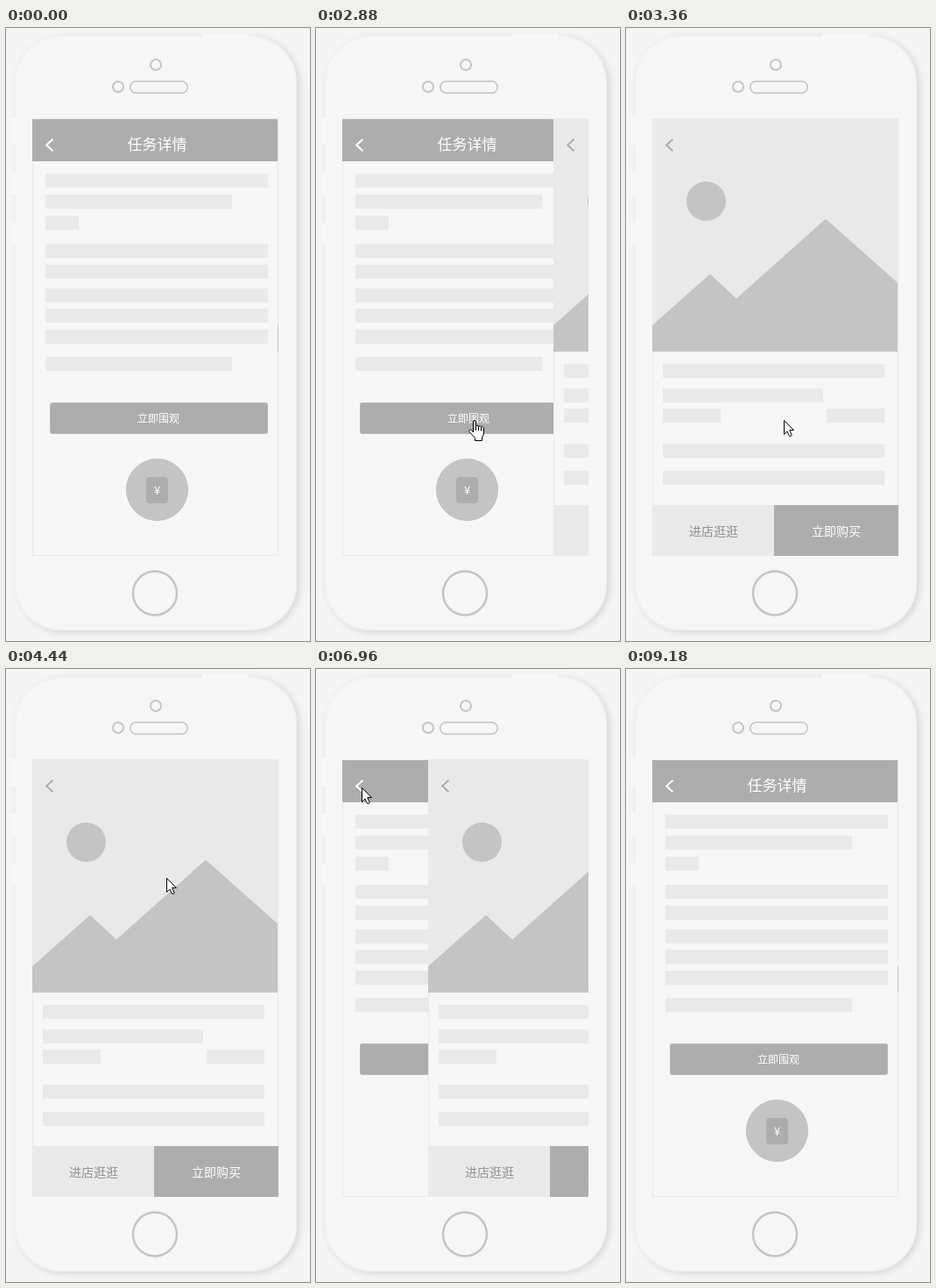
These frames come from a looping animation (347 by 699 pixels, 9.9 s). An HTML page:

```html
<!DOCTYPE html>
<html lang="zh-CN">
<head>
<meta charset="utf-8">
<title>任务详情</title>
<style>
  html, body { margin: 0; width: 100%; height: 100%; overflow: hidden; background: #f5f5f5; }
  svg { display: block; width: 100vw; height: 100vh; }
  text { font-family: "Noto Sans CJK SC", "Noto Sans CJK", sans-serif; text-anchor: middle; fill: #fff; }
  .light { fill: #e9e9e9; }
  .mid { fill: #c4c4c4; }
  .dark { fill: #adadad; }
  .page { fill: #f6f6f6; stroke: #e9e9e9; shape-rendering: crispEdges; }
  .line { fill: none; stroke: #c4c4c4; stroke-width: 2; }
  .chevron { fill: none; stroke-width: 2; }
  #pointer path { fill: #fff; stroke: #000; stroke-linejoin: round; }
</style>
</head>
<body>
<svg viewBox="0 0 347 699" xmlns="http://www.w3.org/2000/svg">
  <defs>
    <clipPath id="screen"><rect x="30" y="103" width="281" height="499"/></clipPath>
    <filter id="shade" x="-10%" y="-10%" width="120%" height="120%">
      <feDropShadow dx="3" dy="2" stdDeviation="4" flood-color="#000" flood-opacity=".14"/>
    </filter>
    <rect id="sheet" class="page" x="30.5" y="103.5" width="280" height="498"/>
    <path id="chevron" class="chevron" d="M53.5 126.7L46.2 133.5L53.5 140.3"/>
  </defs>
  <rect width="347" height="699" fill="#f5f5f5"/>

  <g id="phone">
    <rect x="10" y="9" width="322" height="678" rx="54" fill="#f6f6f6" filter="url(#shade)"/>
    <rect x="10.5" y="9.5" width="321" height="677" rx="53.5" fill="none" stroke="#efefef"/>
    <g fill="#f7f7f7">
      <rect x="224" y="6" width="53" height="5" rx="1"/>
      <rect x="6" y="102" width="6" height="31" rx="1"/>
      <rect x="6" y="165" width="6" height="25" rx="1"/>
      <rect x="6" y="222" width="6" height="24" rx="1"/>
    </g>
    <g class="line">
      <circle cx="171" cy="42" r="6"/>
      <circle cx="128" cy="67" r="6"/>
      <rect x="141.8" y="60.8" width="65.4" height="13.4" rx="6.7" stroke-width="1.6"/>
      <circle cx="170" cy="644.5" r="25" stroke-width="2.5"/>
    </g>
  </g>

  <g clip-path="url(#screen)">
    <g id="task">
      <use href="#sheet"/>
      <rect class="dark" x="30" y="104" width="281" height="48"/>
      <use href="#chevron" stroke="#fff"/>
      <text x="172.5" y="139" font-size="17">任务详情</text>
      <rect id="watch" x="50.5" y="427.5" width="248" height="35" rx="2" stroke="#b8b8b8"/>
      <text x="174" y="450" font-size="12">立即围观</text>
      <circle class="mid" cx="172.5" cy="526.5" r="35" stroke="#bdbdbd"/>
      <rect class="dark" x="160" y="512" width="25" height="30" rx="4"/>
      <text x="172.5" y="532" font-size="13">¥</text>
    </g>

    <g id="shop">
      <use href="#sheet"/>
      <rect class="light" x="30" y="103" width="281" height="266"/>
      <circle class="mid" cx="91.5" cy="197.5" r="22.5"/>
      <path class="mid" d="M30 339L96 280.5L126 308.5L228 217.5L310 290.5V369H30Z"/>
      <use id="back" href="#chevron"/>
      <rect class="light" x="30" y="544" width="139" height="58"/>
      <rect class="dark" x="169" y="544" width="142" height="58"/>
      <text x="100" y="578.5" font-size="14" style="fill:#929292">进店逛逛</text>
      <text x="240" y="578.5" font-size="14">立即购买</text>
    </g>
  </g>

  <g id="pointer">
    <path id="arrow" d="M.5 .5V16.5L3.9 13L6.6 18.4H8.4L9.2 17.2L6.7 11.6H11.5Z"/>
    <g id="hand" transform="translate(-6 0)">
      <path d="M5.5 14V2a1.5 1.5 0 0 1 3 0V7.5a1.5 1.5 0 0 1 3 .5a1.5 1.5 0 0 1 3 .8a1.5 1.5 0 0 1 3 1V16L15.5 20V23.5H7.5V20.5L1.2 13.5C-.2 11.4 2.4 10.2 3.6 11.8Z"/>
      <path d="M8.5 7.5V12M11.5 8V12M14.5 9V12.5"/>
    </g>
  </g>
</svg>
<script>
const LOOP = 9900, STEP = 60, AWAY = 280, SLIDE = 500;
const $ = id => document.getElementById(id);

// Placeholder text: one bar per width, evenly spaced downwards
function paragraph(page, x, y, gap, ...widths) {
  widths.forEach((w, i) => $(page).insertAdjacentHTML("beforeend",
    `<rect class="light" x="${x}" y="${Math.floor(y + i * gap)}" width="${w}" height="15.5" shape-rendering="crispEdges"/>`));
}
paragraph("task", 45, 166, 24, 254, 213, 38);
paragraph("task", 45, 246, 24, 254, 254);
paragraph("task", 45, 297, 23.5, 254, 254, 254);
paragraph("task", 45, 375, 0, 213);
paragraph("shop", 42, 383, 0, 253);
paragraph("shop", 42, 411, 23, 183, 66);
paragraph("shop", 229, 434, 0, 66);
paragraph("shop", 42, 474, 31, 253, 253);

// The pointer rests wherever it stops, then sets off again
const path = [];
const stop = (time, x, y, rest = 0) => {
  path.push({ time, x, y });
  if (rest) path.push({ time: time + rest, x, y });
};
stop(120, 345, 50);
stop(1140, 174, 395);
stop(1620, 180, 447, 2220);
stop(4140, 54, 127);
stop(4440, 183, 238);
stop(4860, 230, 414);
stop(5160, 252, 561, 360);
stop(6000, 66, 169);
stop(6180, 52, 135, 1020);
stop(7740, 118, 486);
stop(8100, 147, 535, 600);
stop(9180, 400, 140);

const clamp = v => Math.max(0, Math.min(1, v));
const within = (v, a, b) => v >= a && v < b;
const rate = (i, k) => (path[i + 1][k] - path[i][k]) / (path[i + 1].time - path[i].time);

// Slope that never overshoots a path point
function slope(i, k) {
  if (i === 0) return rate(0, k);
  if (i === path.length - 1) return rate(i - 1, k);
  const a = rate(i - 1, k), b = rate(i, k);
  return a * b > 0 ? 2 * a * b / (a + b) : 0;
}

function along(t, k) {
  let i = 0;
  while (i < path.length - 2 && t >= path[i + 1].time) i++;
  const p = path[i], q = path[i + 1], d = q.time - p.time;
  const u = clamp((t - p.time) / d), v = 1 - u;
  return Math.round(v * v * (1 + 2 * u) * p[k] + u * u * (3 - 2 * u) * q[k]
    + d * u * v * (v * slope(i, k) - u * slope(i + 1, k)));
}

function isLink(x, y, shift) {
  const px = x - shift;
  if (px >= 30) {
    return within(px, 44, 56) && within(y, 125, 141)
      || within(px, 169, 311) && within(y, 544, 602);
  }
  return within(x, 50, 299) && within(y, 427, 463);
}

const show = (id, on) => { $(id).style.display = on ? "" : "none"; };

function draw(time) {
  const t = Math.floor(time % LOOP / STEP) * STEP;
  const shift = Math.round(AWAY * (1 - clamp((t - 2810) / SLIDE) + clamp((t - 6785) / SLIDE)));
  $("shop").setAttribute("transform", `translate(${shift} 0)`);
  $("watch").setAttribute("fill", within(t, 2640, 2820) ? "#9c9c9c" : "#adadad");
  $("back").setAttribute("stroke", within(t, 6600, 6780) ? "#8c8c8c" : "#adadad");

  const x = along(t, "x"), y = along(t, "y"), link = isLink(x, y, shift);
  $("pointer").setAttribute("transform", `translate(${x} ${y})`);
  show("pointer", within(t, 180, 9180));
  show("hand", link);
  show("arrow", !link);
}

const start = performance.now();
function tick() {
  draw(performance.now() - start);
  requestAnimationFrame(tick);
}
tick();
</script>
</body>
</html>
```
